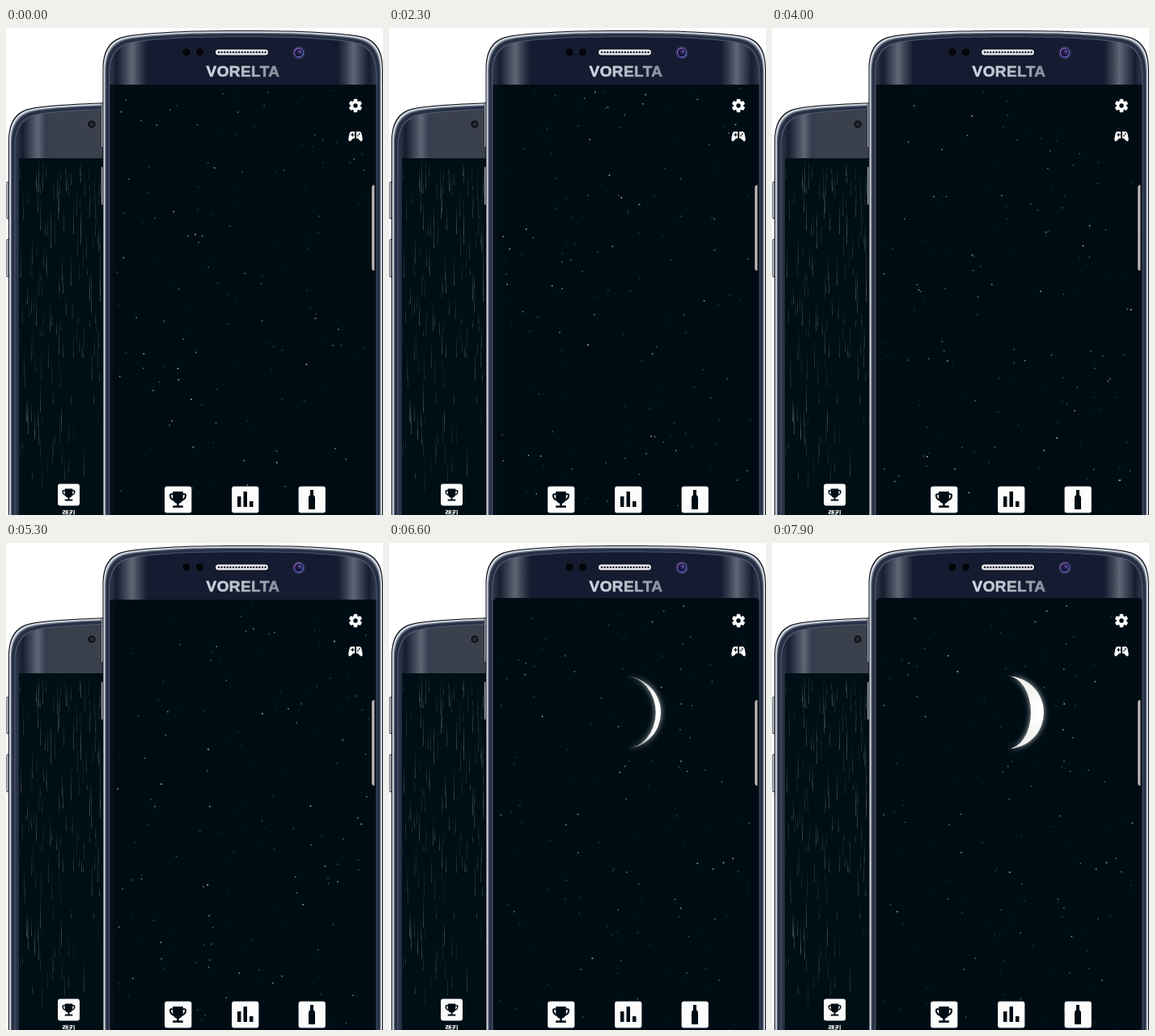
Animation, 466 px wide and 602 px high, one loop 8000 ms. Source, as an HTML page with a canvas:

```html
<!DOCTYPE html>
<html lang="ko">
<head>
<meta charset="utf-8">
<title>Night sky phones</title>
<style>
html, body { margin: 0; width: 100%; height: 100%; overflow: hidden; background: #fff; }
canvas { display: block; }
</style>
</head>
<body>
<canvas id="stage" width="466" height="602"></canvas>
<script>
const W = 466, H = 602, LOOP = 8000, STEP = 100, MOON_AT = 5600;
const INK = '#000c14', PAPER = '#fcfcfc';
const stage = document.getElementById('stage').getContext('2d');
const backdrop = document.createElement('canvas');
backdrop.width = W;
backdrop.height = H;
let c = backdrop.getContext('2d');

function seeded(seed) {
  return () => {
    seed = (seed + 0x6D2B79F5) | 0;
    let v = Math.imul(seed ^ (seed >>> 15), 1 | seed);
    v = (v + Math.imul(v ^ (v >>> 7), 61 | v)) ^ v;
    return ((v ^ (v >>> 14)) >>> 0) / 4294967296;
  };
}
const clamp = v => Math.max(0, Math.min(1, v));

function rect(x, y, w, h, fill) {
  c.fillStyle = fill;
  c.fillRect(x, y, w, h);
}
function round(x, y, w, h, r, fill) {
  c.beginPath();
  c.roundRect(x, y, w, h, r);
  c.fillStyle = fill;
  c.fill();
}
function disc(x, y, r, fill) {
  c.beginPath();
  c.arc(x, y, r, 0, Math.PI * 2);
  c.fillStyle = fill;
  c.fill();
}
function blend(x0, y0, x1, y1, ...colors) {
  const g = c.createLinearGradient(x0, y0, x1, y1);
  colors.forEach((color, i) => g.addColorStop(i / (colors.length - 1), color));
  return g;
}

// Shell outline, inset by d on the sides and top
function shell(l, r, top, d, fill) {
  const a = l + d, b = r - d, t = top + d, m = (l + r) / 2;
  c.beginPath();
  c.moveTo(a, H + 5);
  c.lineTo(a, t + 49);
  c.bezierCurveTo(a, t + 23, a + 9, t + 9, a + 34, t + 6);
  c.bezierCurveTo(a + 75, t + 1, m - 60, t, m, t);
  c.bezierCurveTo(m + 60, t, b - 75, t + 1, b - 34, t + 6);
  c.bezierCurveTo(b - 9, t + 9, b, t + 23, b, t + 49);
  c.lineTo(b, H + 5);
  c.closePath();
  c.fillStyle = fill;
  c.fill();
}

// Glass face with the same sheen near both sides
function gloss(l, r, base) {
  const g = c.createLinearGradient(l, 0, r, 0);
  const sheen = ['#313a4e', '#171d2d', '#3a4153', '#5f6675', '#363d4e', base];
  sheen.forEach((color, i) => {
    const at = (8 + i * 9.5) / (r - l);
    g.addColorStop(at, color);
    g.addColorStop(1 - at, color);
  });
  return g;
}

function phone(l, r, top, base) {
  shell(l, r, top, 0, '#0d111a');
  shell(l, r, top, 1, '#d3d8df');
  shell(l, r, top, 2.8, '#6d7687');
  shell(l, r, top, 4, '#273044');
  shell(l, r, top, 7.5, '#56607a');
  shell(l, r, top, 8.3, gloss(l, r, base));
}

function sideKey(x, y, h) {
  round(x, y, 4, h, 1.5, '#2a303c');
  rect(x + 0.8, y + 1, 1.4, h - 2, '#cdd2d9');
}

function trophy(x, y, s) {
  c.save();
  c.translate(x, y);
  c.scale(s, s);
  c.beginPath();
  c.roundRect(-9, -6.5, 18, 7, [1, 1, 5, 5]);
  c.strokeStyle = INK;
  c.lineWidth = 2;
  c.stroke();
  round(-6, -9.5, 12, 14, [0, 0, 6, 6], INK);
  rect(-1.2, 3, 2.4, 5, INK);
  rect(-6, 7, 12, 2.4, INK);
  c.restore();
}

function gear(x, y) {
  c.save();
  c.translate(x, y);
  for (let i = 0; i < 6; i++) {
    c.rotate(Math.PI / 3);
    round(-2.3, -8.2, 4.6, 6, 0.8, PAPER);
  }
  disc(0, 0, 6.2, PAPER);
  disc(0, 0, 2.7, INK);
  c.restore();
}

function gamepad(x, y) {
  c.save();
  c.translate(x, y);
  c.beginPath();
  c.moveTo(0, -6);
  for (const s of [1, -1]) {
    c.moveTo(0, -6);
    c.lineTo(5 * s, -6);
    c.quadraticCurveTo(7 * s, -6, 7.6 * s, -3);
    c.lineTo(8.8 * s, 3.5);
    c.quadraticCurveTo(8.6 * s, 7, 5.8 * s, 5.6);
    c.lineTo(3 * s, 2.6);
    c.lineTo(-s, 2.6);
    c.lineTo(-s, -6);
  }
  c.fillStyle = PAPER;
  c.fill();
  rect(-5.8, -2.6, 4.4, 1.2, INK);
  rect(-4.2, -4.2, 1.2, 4.4, INK);
  disc(3, -0.8, 0.9, INK);
  disc(4.8, -3, 0.9, INK);
  c.restore();
}

function rain() {
  const rnd = seeded(41);
  for (let i = 0; i < 170; i++) {
    const x = 17 + Math.floor(rnd() * 102);
    const y = 162 + Math.pow(rnd(), 1.5) * 390;
    const len = 8 + rnd() * 36;
    const a = 0.12 + rnd() * 0.33;
    rect(x, y, 1, len, blend(0, y, 0, y + len, 'rgba(130,148,152,0)', `rgba(130,148,152,${a})`));
  }
}

function backPhone() {
  sideKey(0.5, 190, 46);
  sideKey(0.5, 261, 47);
  phone(3, 349, 92, '#3b404d');
  rect(16, 161, 110, H, '#000f16');
  rain();
  disc(106, 119, 5.8, '#4d525c');
  disc(106, 119, 5, '#14161c');
  disc(106, 119, 2.5, '#282a32');
  round(64, 563.5, 27, 27, 3, PAPER);
  trophy(77.5, 577, 0.8);
  c.font = 'bold 9px "Noto Sans CJK KR", "Noto Sans CJK", sans-serif';
  c.textAlign = 'center';
  c.fillStyle = PAPER;
  c.fillText('랭킹', 77.5, 604);
}

function frontCamera(x, y) {
  disc(x, y, 8, '#35385a');
  disc(x, y, 7, '#110f26');
  c.lineWidth = 1.6;
  c.strokeStyle = blend(x - 6, y - 6, x + 6, y + 6, '#a870b8', '#4f4aa8', '#5c86cc');
  c.beginPath();
  c.arc(x, y, 5.6, 0, Math.PI * 2);
  c.stroke();
  disc(x, y, 3.2, blend(x + 3, y - 3, x - 3, y + 3, '#9a86d8', '#2a1f58', '#171238'));
}

function frontPhone() {
  sideKey(117.5, 92, 56);
  sideKey(117.5, 171, 48);
  phone(119.5, 466, 3, '#151b30');
  rect(128.5, 70, 329, H, '#080d17');

  for (const x of [223, 239.5]) {
    disc(x, 30, 5.6, '#222839');
    disc(x, 30, 4.8, '#03050b');
  }
  round(258, 25.5, 67, 9, 4.5, '#090c15');
  round(259, 26.5, 65, 7, 3.5, '#e6e8ec');
  for (let x = 263; x < 322; x += 3.6) disc(x, 30, 1.25, '#1a1e2a');
  frontCamera(362, 30.5);

  c.font = 'bold 19px "Liberation Sans", Arial, sans-serif';
  c.textAlign = 'center';
  c.letterSpacing = '0.4px';
  c.fillStyle = c.strokeStyle = blend(247, 46, 338, 60, '#cddce4', '#b4bcc6', '#868c97');
  c.lineWidth = 0.6;
  c.fillText('VORELTA', 293, 60);
  c.strokeText('VORELTA', 293, 60);
  c.letterSpacing = '0px';
}

function appIcons() {
  gear(432, 96);
  gamepad(432, 134);
  for (const x of [196, 279, 361.5]) {
    round(x, 566.5, 33.5, 33, 3, '#c9cccd');
    round(x + 0.7, 567.2, 32, 31.6, 2.5, PAPER);
  }
  trophy(212.5, 583, 1.05);
  [13, 19, 7].forEach((h, i) => rect(286 + i * 7.5, 592 - h, 4.5, h, INK));
  rect(376, 571, 4, 8, INK);
  round(374, 577, 8, 18, [4, 4, 0.5, 0.5], INK);
}

function star(rnd, glow) {
  const x = 137 + rnd() * 312, y = 74 + rnd() * 522;
  const level = 0.16 + 0.68 * Math.pow(rnd(), 1.4);
  c.globalAlpha = glow * level;
  disc(x, y, 0.7 + 0.3 * level, '#d6dcda');
}

// Each star glows for a while, then returns somewhere else
function openingSky(t) {
  for (let i = 0; i < 165; i++) {
    const own = seeded(i * 7919 + 5);
    const age = t / (1300 + own() * 1500) + own();
    const turn = Math.floor(age);
    star(seeded(i * 131 + turn * 9973), Math.sqrt(Math.sin(Math.PI * (age - turn))));
  }
}

function moonlitSky(t) {
  for (let i = 0; i < 150; i++) {
    const rnd = seeded(i * 613 + 77);
    const glow = 0.75 + 0.25 * Math.sin(t / (220 + rnd() * 400) + rnd() * 6);
    star(rnd, glow);
  }
}

function moon(t) {
  const x = 291, y = 209.5, r = 45;
  const grown = clamp((t - 6300) / 1600);
  const inner = 41 - 12 * grown;
  const tip = Math.round(55 + 180 * grown);
  const light = c.createRadialGradient(x + r, y, 8, x + r, y, 62);
  light.addColorStop(0, '#fff');
  light.addColorStop(0.4, '#f4f4f2');
  light.addColorStop(1, `rgb(${tip},${tip},${tip})`);
  c.globalAlpha = clamp((t - 5700) / 600);
  c.shadowColor = 'rgba(205,210,212,0.9)';
  c.shadowBlur = 7;
  c.beginPath();
  c.arc(x, y, r, -Math.PI / 2, Math.PI / 2);
  c.ellipse(x, y, inner, r, 0, Math.PI / 2, -Math.PI / 2, true);
  c.fillStyle = light;
  c.fill();
  c.shadowBlur = 0;
}

function sky(t) {
  const late = t >= MOON_AT;
  const left = late ? 131 : 133, top = late ? 68 : 70;
  c.save();
  c.beginPath();
  c.rect(left, top, 456 - left, H);
  c.clip();
  rect(left, top, 330, H, INK);
  if (late) {
    moonlitSky(t);
    moon(t);
  } else {
    openingSky(t);
  }
  c.restore();
}

function edgeKey() {
  round(452, 194, 3.5, 106, [3.5, 0, 0, 3.5], blend(452, 0, 456, 0, '#8f8c8c', '#c8c2bf', '#8b8788'));
}

// The picture holds for two steps at the start and before the moon grows
function stepped(ms) {
  const t = Math.floor(ms % LOOP / STEP) * STEP;
  return t === 100 || t === 6400 ? t - STEP : t;
}

function draw(now) {
  c.drawImage(backdrop, 0, 0);
  sky(stepped(now));
  edgeKey();
  appIcons();
}

rect(0, 0, W, H, '#fff');
backPhone();
frontPhone();
c = stage;

const start = performance.now();
function tick() {
  draw(performance.now() - start);
  requestAnimationFrame(tick);
}
tick();
</script>
</body>
</html>
```
